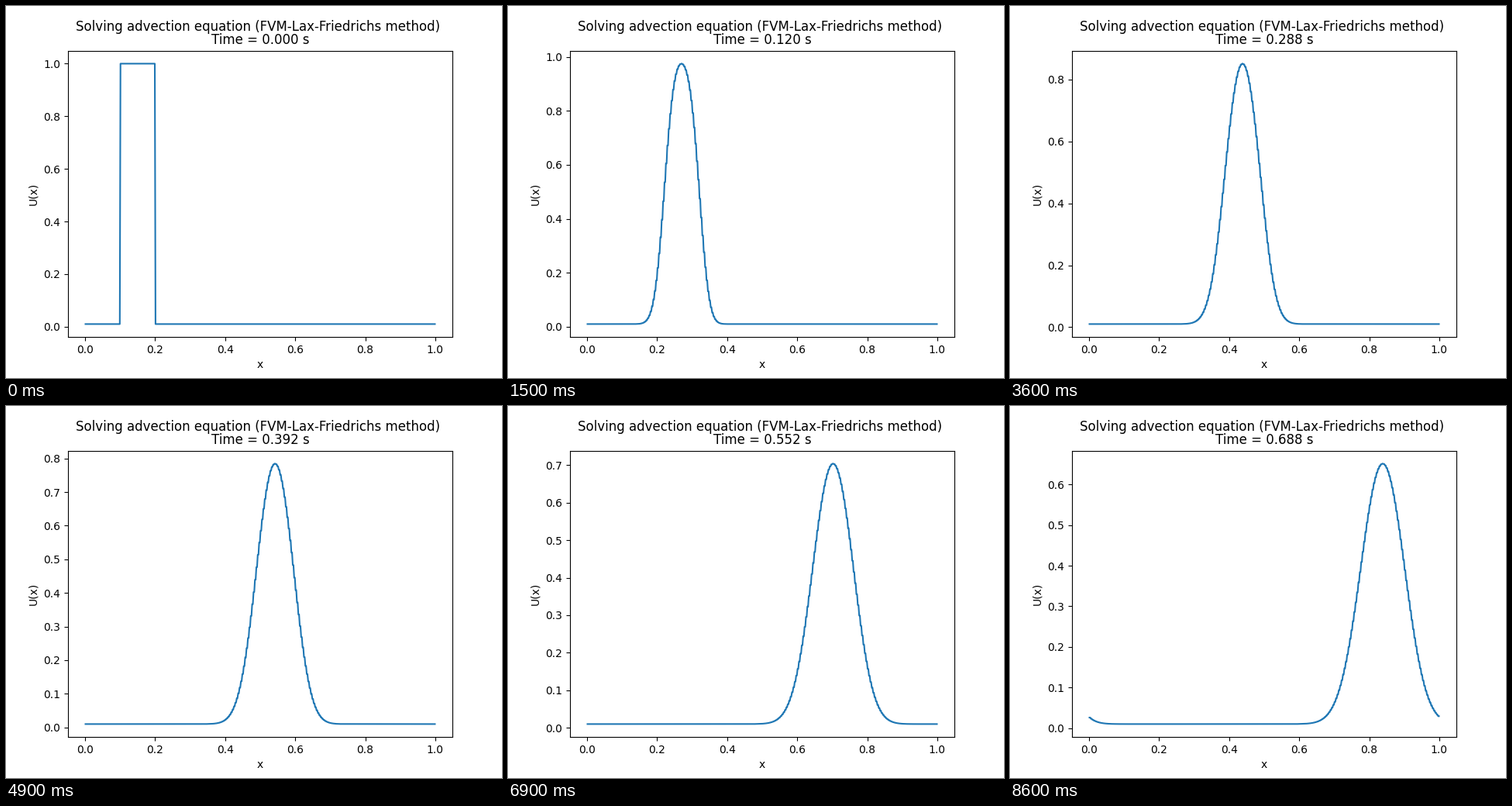
Recreate the animation shown at these times as a matplotlib script. Size 640x480 px, loop 8.7 s.

```python
import numpy as np
import matplotlib.pyplot as plt
from matplotlib.animation import FuncAnimation

N = 500                 # cells on [0, 1]
DX = 1.0 / N
DT = 0.0008
SPEED = 1.0
FRAMES = 87
STEPS = 10              # solver steps per frame

x = (np.arange(N) + 0.5) * DX   # cell centres


def initial():
    return np.where((x > 0.1) & (x < 0.2), 1.0, 0.01)


def advance(u):
    """One Lax-Friedrichs step with periodic ends."""
    left, right = np.roll(u, 1), np.roll(u, -1)
    c = SPEED * DT / DX
    return 0.5 * (left + right) - 0.5 * c * (right - left)


def solve():
    u = initial()
    states = [u]
    for _ in range(FRAMES - 1):
        for _ in range(STEPS):
            u = advance(u)
        states.append(u)
    return states


states = solve()

fig, ax = plt.subplots(figsize=(6.4, 4.8), dpi=100)
line, = ax.plot(x, states[0])
ax.set_xlabel("x")
ax.set_ylabel("U(x)")

# Heading sits just above the time line, slightly left of centre.
ax.annotate("Solving advection equation (FVM-Lax-Friedrichs method)",
            (0.5, 1.0), xycoords="axes fraction",
            xytext=(-1.9, 18.24), textcoords="offset points",
            ha="center", va="baseline", fontsize=12)


def update(i):
    line.set_ydata(states[i])
    ax.relim()
    ax.autoscale_view()
    ax.set_title(f"Time = {i * STEPS * DT:.3f} s")
    return line,


anim = FuncAnimation(fig, update, frames=FRAMES, interval=100,
                     init_func=lambda: update(0), repeat=True,
                     repeat_delay=0, blit=False)
plt.show()
```
